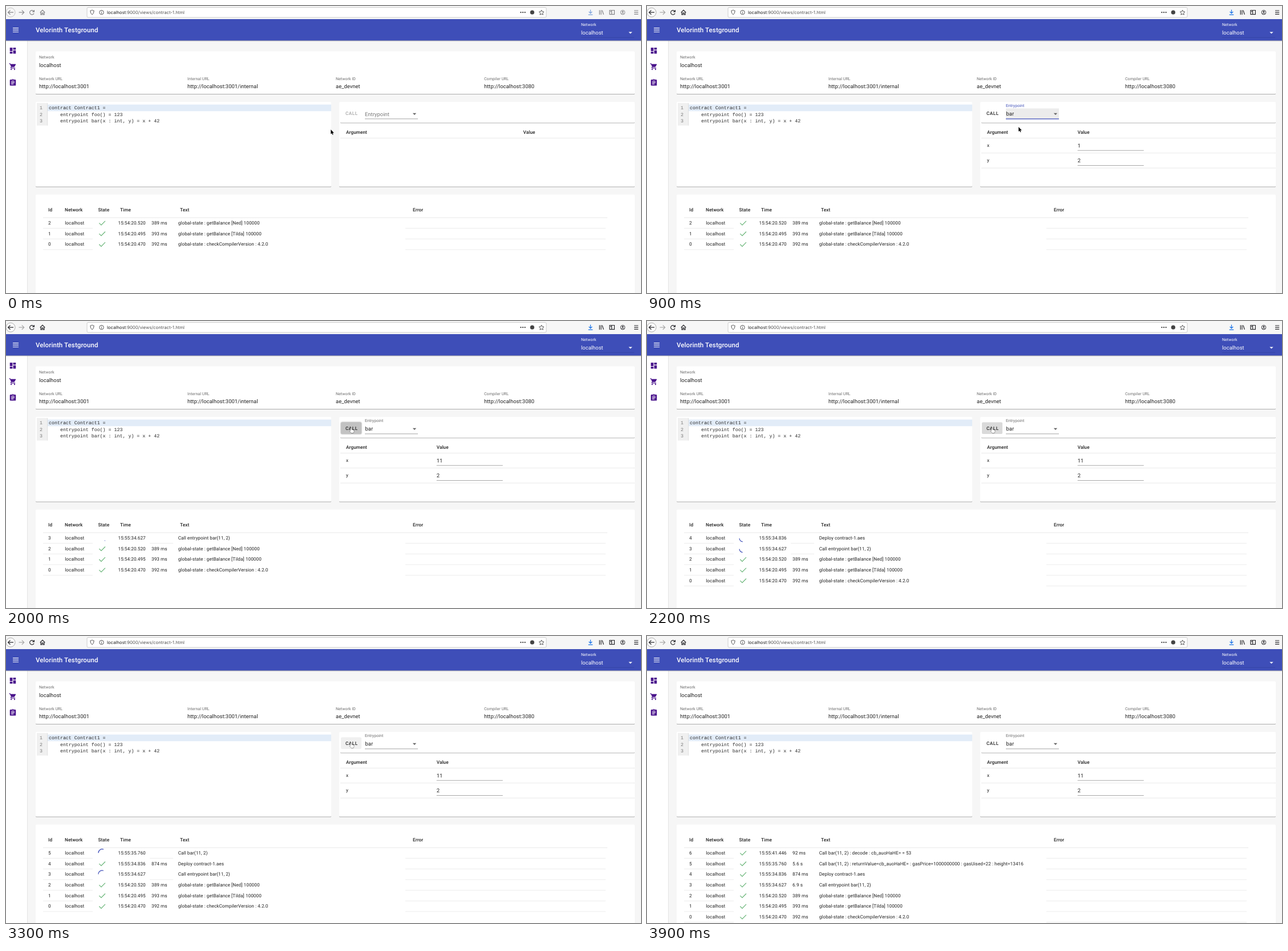
Recreate the animation shown at these times as an HTML page. Size 1113 by 503 pixels, loop 6.9 s.

```html
<!DOCTYPE html>
<html lang="en">
<head>
<meta charset="utf-8">
<title>Contract playground</title>
<style>
html, body { margin: 0; width: 100%; height: 100%; overflow: hidden; background: #f6f6f6; }
svg { display: block; width: 1113px; height: 503px; }
text { font: 8.17px Roboto, sans-serif; letter-spacing: .075px; fill: #202020; white-space: pre; text-rendering: geometricPrecision; }
.head { font-weight: 500; letter-spacing: .1px; }
.field { font-size: 9.33px; letter-spacing: .06px; }
.label { font-size: 7px; letter-spacing: .06px; fill: #6b6b6b; }
.call { font-weight: 500; letter-spacing: .5px; }
.title { font-size: 11.5px; font-weight: 500; letter-spacing: .1px; }
.code { font: 8.3px "Liberation Mono", monospace; letter-spacing: 0; fill: #2a2a2a; }
.url { font: 7.72px Inter, sans-serif; letter-spacing: 0; }
.white { fill: #fff; }
.blue { fill: #3e4eb8; }
.gray { fill: #777; }
.card { fill: #fff; filter: drop-shadow(0 1px .5px rgba(0, 0, 0, .3)); }
.icon { fill: none; stroke: currentColor; stroke-width: 1.2; }
.thin { stroke-width: .9; }
</style>
</head>
<body>
<svg viewBox="0 0 1113 503"><g id="page"></g><g id="live"></g></svg>
<script>
const LOOP = 6900, STEP = 100, BLUE = '#3e4eb8';
const page = document.getElementById('page'), live = document.getElementById('live');

const text = (x, y, s, cls = '') => `<text x="${x}" y="${y}" class="${cls}">${s}</text>`;
const rect = (x, y, w, h, fill, extra = '') => `<rect x="${x}" y="${y}" width="${w}" height="${h}" fill="${fill}" ${extra}/>`;
const card = (x, y, w, h) => rect(x, y, w, h, '#fff', 'rx="1.5" class="card"');
const rule = (x1, x2, y, color = '#e2e2e2', w = .8) => `<path d="M${x1} ${y}H${x2}" stroke="${color}" stroke-width="${w}"/>`;
const icon = (d, color, cls = '') => `<path class="icon ${cls}" d="${d}" style="color:${color}"/>`;
const solid = (d, color, x, y, k = 1) => `<path d="${d}" fill="${color}" transform="translate(${x} ${y}) scale(${k})"/>`;
const caretDown = (x, y, color) => solid('M-3.2-1.6H3.2L0 1.6z', color, x, y);

// Piecewise linear value over keys of [time, a, b]
function track(keys, t) {
  let i = keys.findIndex(k => k[0] > t);
  if (i < 0) return keys.at(-1).slice(1);
  if (!i) return keys[0].slice(1);
  const a = keys[i - 1], b = keys[i], p = (t - a[0]) / (b[0] - a[0]);
  return [1, 2].map(n => a[n] + (b[n] - a[n]) * p);
}

const pointerKeys = [
  [0, 569, 216], [100, 575, 214], [400, 672, 187], [600, 672, 187], [700, 668, 193],
  [900, 651, 211.5], [1000, 651, 211.5], [1200, 765, 240], [1300, 765, 240], [1600, 529.7, 233],
  [1700, 536, 230], [1800, 590, 195], [1900, 605, 187], [3400, 605, 187], [3800, 33, 498]
];
const arcKeys = [[2000, 132, 140], [2600, 300, 510], [3300, 630, 740], [3500, 720, 950]];

const log = [
  { id: 0, at: 0, end: 0, time: '15:54:20.470', took: '392 ms', text: 'global-state : checkCompilerVersion : 4.2.0' },
  { id: 1, at: 0, end: 0, time: '15:54:20.495', took: '393 ms', text: 'global-state : getBalance [Tilda] 100000' },
  { id: 2, at: 0, end: 0, time: '15:54:20.520', took: '389 ms', text: 'global-state : getBalance [Ned] 100000' },
  { id: 3, at: 2000, end: 3500, time: '15:55:34.627', took: '6.9 s', text: 'Call entrypoint bar(11, 2)' },
  { id: 4, at: 2100, end: 2400, time: '15:55:34.836', took: '874 ms', text: 'Deploy contract-1.aes' },
  { id: 5, at: 2400, end: 3400, time: '15:55:35.760', took: '5.6 s', text: 'Call bar(11, 2)',
    result: ' : returnValue=cb_auoHaHE= : gasPrice=1000000000 : gasUised=22 : height=13416' },
  { id: 6, at: 3400, end: 3500, time: '15:55:41.446', took: '92 ms', text: 'Call bar(11, 2)', result: ' : decode : cb_auoHaHE= = 53' }
].reverse();

function drawPage() {
  const purple = '#4a148c';
  const info = [[58, 'Network URL', 'http://localhost:3001'], [318, 'Internal URL', 'http://localhost:3001/internal'],
    [578, 'Network ID', 'ae_devnet'], [838, 'Compiler URL', 'http://localhost:3080']];
  const code = ['contract Contract1 =', '    entrypoint foo() = 123', '    entrypoint bar(x : int, y) = x + 42'];
  const heads = [[74, 'Id'], [103, 'Network'], [161.5, 'State'], [200, 'Time'], [305, 'Text'], [713, 'Error']];
  page.innerHTML =
    rect(0, 0, 1113, 503, '#f6f6f6') +
    rect(0, 61, 37, 442, '#fff') + rect(37, 61, .8, 442, '#e0e0e0') +
    `<g class="card">${rect(0, 23, 1113, 37.5, BLUE)}</g>` +
    rect(142, 2.5, 805, 17.5, '#fff', 'rx="2" stroke="#c8c8c8" stroke-width=".9"') +
    text(177, 14, 'localhost<tspan fill="#555">:9000/views/contract-1.html</tspan>', 'url') +
    icon('M12 38.7h10M12 42.1h10M12 45.5h10', '#fff') +
    text(52, 46, 'Velorinth Testground', 'title white') +
    text(1008, 35, 'Network', 'label white') + text(1008, 49.8, 'localhost', 'field white') +
    rule(1008, 1101, 55.2, '#3444a3') + caretDown(1094.5, 47, '#fff') +
    solid('M3 13h8V3H3zm0 8h8v-6H3zm10 0h8V11h-8zm0-18v6h8V3z', purple, 5, 71.3, .583) +
    solid('M7 18a2 2 0 1 0 .01 0zM1 2v2h2l3.6 7.6-1.4 2.4c-.7 1.4.3 3 1.8 3h12v-2H7.4l-.2-.4.9-1.6h7.4c.8 0 1.4-.4 1.8-1l3.6-6.5A1 1 0 0 0 20 4H5.2l-.9-2zm16 16a2 2 0 1 0 .01 0z', purple, 5, 99.3, .583) +
    solid('M19 3h-4.2a3 3 0 0 0-5.6 0H5a2 2 0 0 0-2 2v14a2 2 0 0 0 2 2h14a2 2 0 0 0 2-2V5a2 2 0 0 0-2-2zm-7 0a1 1 0 1 1 0 2 1 1 0 0 1 0-2zm2 14H7v-2h7zm3-4H7v-2h10zm0-4H7V7h10z', purple, 5, 127.3, .583) +
    card(52, 79.5, 1050, 74.5) + card(52, 168, 518, 148.5) + card(584, 168, 518, 148.5) + card(52, 330.5, 1050, 190) +
    text(58, 92, 'Network', 'label') + text(58, 107, 'localhost', 'field') +
    info.map(([x, name, value]) => text(x, 129.5, name, 'label') + text(x, 144.2, value, 'field')).join('') +
    rect(54, 170, 19, 39.5, '#f0f0f0') + rect(72.3, 170, .7, 39.5, '#d8d8d8') + rect(73, 172.7, 497, 11.6, '#e2ecf8') +
    code.map((line, i) => text(59, 181 + i * 11.67, i + 1, 'code gray') + text(75, 181 + i * 11.67, line, 'code')).join('') +
    card(586, 170, 516, 34.5) + text(596, 223.6, 'Argument', 'head') + rule(586, 1102, 231.5) +
    heads.map(([x, s]) => text(x, 359.8, s, 'head')).join('') + rule(65, 1054, 371);
}

function drawToolbar(active) {
  const ink = active ? '#2a2a2e' : '#858588', pale = active ? '#aaa' : '#919194';
  const lines = 'M3.5 11.2H13M7.5 7.4L3.6 11.2l3.9 3.8' +
    'M48.7 9.4A3.8 3.8 0 1 0 49 12.7M49.4 7v3.2h-3.2' +
    'M59.7 11.4L64 7.2l4.3 4.2M61 10.5v4.7h2v-3h2v3h2v-4.7' +
    'M1040.3 7.2v8M1043 7.2v8M1045 7.5l2.4 7.5' +
    'M1058 7.5h8.4v7.2H1058zM1061.6 7.5v7.2M1059 9.7h1.8' +
    'M1101 8h7.2M1101 11.2h7.2M1101 14.4h7.2';
  const badges = 'M147.8 8.2q1.6 0 3.2-1.2 1.6 1.2 3.2 1.2 0 5.2-3.2 6.8-3.2-1.6-3.2-6.8z' +
    'M171.2 11.2a3.7 3.7 0 1 1-7.4 0 3.7 3.7 0 1 1 7.4 0M167.5 10.7v2.8M167.5 8.7v1' +
    'M938.6 7l1.3 2.8 3 .4-2.2 2.1.6 3.1-2.7-1.5-2.7 1.5.6-3.1-2.2-2.1 3-.4z';
  const account = 'M1084.8 11.2a3.8 3.8 0 1 1-7.6 0 3.8 3.8 0 1 1 7.6 0M1078.5 13.6q2.5-2 5 0';
  return `<circle cx="8" cy="11.2" r="8" fill="${active ? '#fbfbfb' : '#f6f6f6'}" stroke="${active ? '#999' : '#b5b5b7'}" stroke-width=".8"/>` +
    icon(lines, ink) + icon('M22.5 11.2h9M27.8 7.4l3.9 3.8-3.9 3.8', pale) +
    icon(badges, '#444', 'thin') + icon(account, ink, 'thin') + `<circle cx="1081" cy="10.2" r="1.4" fill="${ink}"/>` +
    [902.4, 906, 909.6].map(x => `<circle cx="${x}" cy="11.2" r="1.1" fill="#333"/>`).join('') +
    '<circle cx="922.3" cy="11.2" r="3.6" fill="#444"/>' +
    icon('M1024.5 6.5v6.2M1021.7 10l2.8 2.8 2.8-2.8M1020.7 15.3h7.6', active ? '#1a73e8' : '#7da2db');
}

function drawCall(t) {
  const chosen = t >= 700, focus = t >= 600 && t < 1300, open = t >= 800;
  const editing = t >= 1300 && t < 1900, hover = t >= 1900 && t < 3500;
  let out = '';
  if (hover) {
    const pressed = t >= 2000 && t < 2200;
    out += rect(587, 177.5, 36, 20.5, pressed ? '#c2c2c2' : t === 2200 ? '#dadada' : '#f0f0f0',
      `rx="2" ${pressed ? 'style="filter:drop-shadow(0 .8px .8px #999)"' : ''}`);
  }
  out += `<g opacity="${chosen ? 1 : .4}">${text(595, 190.8, 'CALL', 'call')}</g>`;
  if (focus) out += rect(629, 179.5, 93, 18, '#ececec');
  out += chosen
    ? text(629, t === 700 ? 181 : 177.2, 'Entrypoint', 'label' + (focus ? ' blue' : '')) + text(629.5, 192.3, 'bar', 'field')
    : text(629, 192.5, 'Entrypoint', 'field ' + (focus ? 'blue' : 'gray'));
  out += rule(629, 722, 197.8, focus ? BLUE : '#8e8e8e', focus ? 1.3 : .8) + caretDown(716, 189.3, '#666');
  out += text(open ? 754.7 : 906.5, 223.6, 'Value', 'head');
  if (!open) return out;
  [['x', t >= 1400 ? '11' : '1'], ['y', '2']].forEach(([name, value], i) => {
    const y = i * 26.3, on = editing && !i;
    out += text(596, 247 + y, name) + text(754.8, 247.6 + y, value, 'field') +
      rule(754.7, 870.7, 253.2 + y, on ? BLUE : '#929292', on ? 1.3 : .8) + rule(586, 1102, 257.7 + y);
  });
  if (editing && t < 1700) out += rect(t < 1400 ? 760.5 : 765.7, 239.3, .7, 10, '#222');
  return out;
}

function drawSpinner(y, t) {
  const [tail, head] = track(arcKeys, t);
  const point = deg => {
    const a = deg * Math.PI / 180;
    return `${168.6 + 6.7 * Math.sin(a)} ${y - 6.7 * Math.cos(a)}`;
  };
  return icon(`M${point(tail)}A6.7 6.7 0 ${+(head - tail > 180)} 1 ${point(head)}`, BLUE);
}

function drawLog(t) {
  return log.filter(row => t >= row.at).map((row, i) => {
    const mid = 380.2 + i * 18.67, y = mid + 2.9, done = t >= row.end;
    return text(74, y, row.id) + text(103.3, y, 'localhost') + text(196.5, y, row.time) +
      text(301.7, y, row.text + (done && row.result || '')) +
      (done ? icon(`M163.3 ${mid + .2}l3.6 3.6 7-7.2`, '#69b578') + text(255, y, row.took)
            : drawSpinner(mid, t) + rule(252, 293, mid + 9.4, '#e8e8e8')) +
      rule(65, 152, mid + 9.4, '#e8e8e8') + rule(700, 1051, mid + 9.4, '#e8e8e8');
  }).join('');
}

function drawPointer(t) {
  if (t >= 3900) return '';
  const [x, y] = track(pointerKeys, t);
  let d = 'M.3.5v8l1.8-1.6 1.3 2.9 1.2-.6-1.2-2.8h2.5z', fill = '#000', stroke = '#fff';
  if (t >= 1200 && t < 1400) {
    d = 'M-1.5-4Q0-4 0-3V3Q0 4-1.5 4M1.5-4Q0-4 0-3M0 3Q0 4 1.5 4';
    fill = 'none'; stroke = '#222';
  } else if (t >= 1900 && t < 3500) {
    d = 'M-.8.8Q0-.5.8.8V3.7Q1.8 3 2.3 4 3.4 3.4 3.7 4.5 5 4.3 4.9 5.6L4.2 9H-.2L-2.8 5.7Q-2.6 4.4-.8 5.7z';
    fill = '#fff'; stroke = '#111';
  }
  return `<path d="${d}" transform="translate(${x} ${y})" fill="${fill}" stroke="${stroke}" stroke-width=".7" paint-order="stroke"/>`;
}

let shown = -1;
function frame() {
  const t = Math.floor(performance.now() % LOOP / STEP) * STEP;
  if (t !== shown) {
    shown = t;
    live.innerHTML = drawToolbar(t >= 300) + drawCall(t) + drawLog(t) + drawPointer(t);
  }
  requestAnimationFrame(frame);
}

drawPage();
frame();
</script>
</body>
</html>
```
